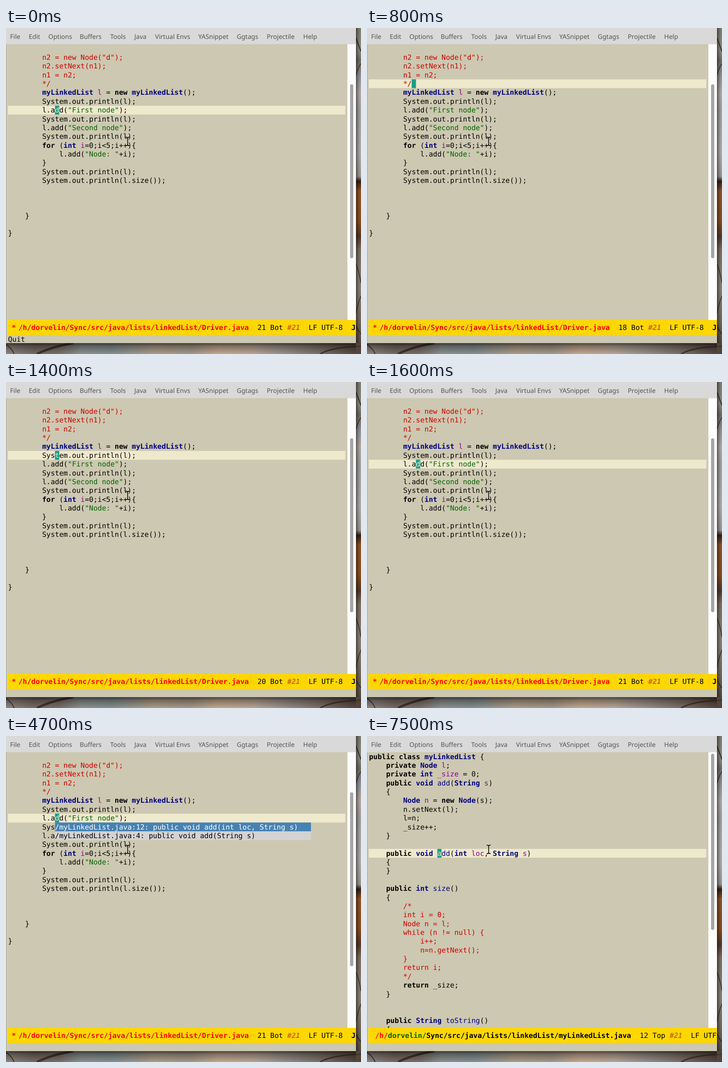
Recreate the animation shown at these times as an HTML page with a canvas. Size 780 by 718 pixels, loop 8 s.

```html
<!DOCTYPE html>
<html lang="en">
<head>
<meta charset="utf-8">
<title>Editor: jump to definition</title>
<style>
  html, body { margin: 0; width: 100%; height: 100%; overflow: hidden; background: #8a8378; }
  canvas { display: block; }
</style>
</head>
<body>
<canvas id="stage" width="780" height="718"></canvas>
<script>
const ctx = document.getElementById('stage').getContext('2d');
const LOOP = 8000;
const W = 780, H = 718;
const WIN_R = 769, WIN_B = 694;
const X0 = 4.5, COL = 9.374, TOP = 35.6, ROW = 19.37, BASE = 15;
const SIZE = 15.57;
const MONO = `${SIZE}px "DejaVu Sans Mono", monospace`;
const BG = '#cdc8b1', HILITE = '#eee8cd', CURSOR = '#1a9e86';

// Markup: @k keyword, @t type, @v variable, @f function; a leading # marks a comment line.
const STYLE = {
  k: ['bold', '#000'],
  t: ['bold', '#00007f'],
  v: ['', '#8b008b'],
  f: ['', '#00007f'],
  s: ['', '#006400'],
  c: ['', '#cd0000'],
  p: ['', '#000']
};

const DRIVER = `
#        n2 = new Node("d");
#        n2.setNext(n1);
#        n1 = n2;
#        */
        @tmyLinkedList @vl = @knew @tmyLinkedList();
        System.out.println(l);
        l.add("First node");
        System.out.println(l);
        l.add("Second node");
        System.out.println(l);
        @kfor (@tint @vi=0;i<5;i++){
            l.add("Node: "+i);
        }
        System.out.println(l);
        System.out.println(l.size());



    }

}`.split('\n');

const LIST = `@kpublic @kclass @tmyLinkedList {
    @kprivate @tNode @vl;
    @kprivate @tint @v_size = 0;
    @kpublic @tvoid @fadd(@tString @vs)
    {
        @tNode @vn = @knew @tNode(s);
        n.setNext(l);
        l=n;
        _size++;
    }

    @kpublic @tvoid @fadd(@tint @vloc, @tString @vs)
    {
    }

    @kpublic @tint @fsize()
    {
#        /*
#        int i = 0;
#        Node n = l;
#        while (n != null) {
#            i++;
#            n=n.getNext();
#        }
#        return i;
#        */
        @kreturn _size;
    }


    @kpublic @tString @ftoString()
    {`.split('\n');

const MENU = [
  ['File', 9], ['Edit', 50], ['Options', 93], ['Buffers', 162], ['Tools', 229], ['Java', 282],
  ['Virtual Envs', 327.5], ['YASnippet', 422.5], ['Ggtags', 507], ['Projectile', 573], ['Help', 653]
];

// Cursor stops in the first buffer: [start ms, row, column]
const STOPS = [
  [0, 7, 11], [400, 6, 11], [600, 5, 11], [800, 4, 10],
  [1300, 5, 11], [1400, 6, 11], [1600, 7, 11]
];

const colX = col => X0 + col * COL;
const rowY = row => TOP + row * ROW;

function rect(color, x, y, w, h) {
  ctx.fillStyle = color;
  ctx.fillRect(x, y, w, h);
}

function clipped(x, y, w, h, draw) {
  ctx.save();
  ctx.beginPath();
  ctx.rect(x, y, w, h);
  ctx.clip();
  draw();
  ctx.restore();
}

function text(str, x, y, color, style = '') {
  ctx.font = `${style} ${MONO}`;
  ctx.fillStyle = color;
  ctx.fillText(str, x, y);
  return x + str.length * COL;
}

function parse(line) {
  if (line[0] === '#') return [['c', line.slice(1)]];
  return line.split(/(@[ktvf]\w+|"[^"]*")/).filter(Boolean).map(part =>
    part[0] === '@' ? [part[1], part.slice(2)] : [part[0] === '"' ? 's' : 'p', part]);
}

function codeLine(line, y, override) {
  let x = X0;
  for (const [kind, str] of parse(line)) {
    const [style, color] = STYLE[kind];
    x = text(str, x, y, override || color, style);
  }
}

function gradient(x0, y0, x1, y1, stops) {
  const g = ctx.createLinearGradient(x0, y0, x1, y1);
  for (const [at, color] of stops) g.addColorStop(at, color);
  return g;
}

function twig(x0, y0, cx, cy, x1, y1, width) {
  ctx.lineWidth = width;
  ctx.strokeStyle = '#43342c';
  ctx.beginPath();
  ctx.moveTo(x0, y0);
  ctx.quadraticCurveTo(cx, cy, x1, y1);
  ctx.stroke();
}

function wallpaper() {
  rect(gradient(0, 0, 0, H, [
    [0, '#9c9689'], [.07, '#a8a49d'], [.1, '#877f78'], [.15, '#adb0b5'], [.2, '#d5c9c3'],
    [.25, '#c0bebf'], [.38, '#d0cdca'], [.455, '#b9b3ac'], [.47, '#37261d'], [.5, '#ad642e'],
    [.59, '#a55d25'], [.64, '#65442e'], [.68, '#968574'], [.8, '#a49a8c'],
    [.9, '#8a7b6b'], [1, '#514238']
  ]), WIN_R, 0, W - WIN_R, H);
  rect(gradient(0, 0, W, 0, [
    [0, '#8e8680'], [.08, '#766962'], [.15, '#786e68'], [.21, '#8c918f'], [.3, '#849092'],
    [.42, '#ae9d89'], [.52, '#a49889'], [.6, '#c4a98f'], [.7, '#b8a596'],
    [.8, '#928b85'], [.88, '#7d7067'], [1, '#514238']
  ]), 0, WIN_B, W, H - WIN_B);
  twig(68, 718, 100, 702, 148, 694, 5);
  twig(0, 697, 12, 704, 18, 718, 2);
  twig(690, 718, 715, 703, 780, 701, 3);
  twig(769, 22, 775, 38, 780, 52, 2);
  twig(780, 78, 773, 88, 769, 104, 1.5);
  twig(769, 520, 776, 536, 780, 562, 1.5);
  twig(780, 590, 773, 606, 769, 630, 1.5);
  twig(769, 655, 774, 668, 780, 674, 2);

  const fade = [[0, 'rgba(0,0,0,.6)'], [.3, 'rgba(0,0,0,.32)'], [1, 'rgba(0,0,0,0)']];
  rect(gradient(0, WIN_B, 0, H, fade), 0, WIN_B, WIN_R, H - WIN_B);
  rect(gradient(WIN_R, 0, W + 4, 0, fade), WIN_R, 0, W - WIN_R, WIN_B);
}

function frame(thumbY, thumbH) {
  rect(BG, 0, 0, WIN_R, WIN_B);
  rect('#aaa692', 0, 36, 1, WIN_B - 36);
  rect('#d9d9d9', 0, 0, WIN_R, 35.6);
  ctx.font = '14.05px "Noto Sans", sans-serif';
  ctx.fillStyle = '#57534f';
  for (const [label, x] of MENU) ctx.fillText(label, x, 23.7);
  rect('#fcfcfc', 750, 35.6, WIN_R - 750, 607.4);
  ctx.fillStyle = '#a5a5a5';
  ctx.beginPath();
  ctx.roundRect(756, thumbY, 7, thumbH, 3.5);
  ctx.fill();
}

function buffer(lines, row, col, flash) {
  clipped(0, TOP, 750, 643 - TOP, () => {
    const y = rowY(row), x = colX(col);
    rect(HILITE, 4, y, 741.5, ROW);
    if (flash) beacon(x, y);
    lines.forEach((line, i) => codeLine(line, rowY(i) + BASE));
    rect(CURSOR, x, y, COL, ROW);
    clipped(x, y, COL, ROW, () => codeLine(lines[row], y + BASE, flash ? '#6f8a83' : HILITE));
  });
}

// Grey flash after the jump, fading to the page colour one column at a time
function beacon(x, y) {
  const steps = 39, from = [128, 128, 128], to = [205, 200, 177];
  for (let i = 0; i < steps; i++) {
    const rgb = from.map((v, c) => Math.round(v + (to[c] - v) * i / steps));
    const left = Math.round(x + i * COL), right = Math.round(x + (i + 1) * COL);
    rect(`rgb(${rgb})`, left, y, right - left, ROW);
  }
}

function modeline(x, path, line, place) {
  clipped(3, 643, WIN_R - 3, 33, () => {
    rect('#ffd700', 3, 643, WIN_R - 3, 33);
    const y = 664.8;
    for (const [str, color] of path) x = text(str, x, y, color, 'bold');
    x += 2 * COL;
    text(`${line} ${place}`, x, y, '#000');
    text('#21', x + 7 * COL, y, '#cd6600', 'italic bold');
    text('LF UTF-8', x + 12 * COL, y, '#000');
    text('Java', x + 22 * COL, y, '#000', 'bold');
  });
}

function popup() {
  const x = colX(11), w = 60 * COL;
  const items = [
    ['/myLinkedList.java:12: public void add(int loc, String s)', '#4682b4', '#fff'],
    ['/myLinkedList.java:4: public void add(String s)', '#d3d3d3', '#000']
  ];
  items.forEach(([str, back, fore], i) => {
    const y = rowY(8 + i);
    rect(back, x, y, w, ROW);
    text(str, x, y + BASE, fore);
  });
}

function pointer() {
  const path = new Path2D('M263 240.5H265.5L267.3 242L269 240.5H271.5M267.3 242V257.5M263 259H265.5L267.3 257.5L269 259H271.5');
  ctx.lineWidth = 3.4;
  ctx.strokeStyle = 'rgba(255,255,255,.7)';
  ctx.stroke(path);
  ctx.lineWidth = 1.8;
  ctx.strokeStyle = '#000';
  ctx.stroke(path);
}

function drawDriver(t) {
  const [, row, col] = STOPS.filter(s => s[0] <= t).pop();
  frame(124, 383);
  buffer(DRIVER, row, col);
  text('*', 12.4, 664.8, '#f00', 'bold');
  modeline(27.5, [['/h/dorvelin/Sync/src/java/lists/linkedList/Driver.java', '#f00']], row + 14, 'Bot');
  text('*', 12.4, 664.8, '#f00', 'bold');
  if (t < 400) codeLine('Quit', 690.6);
  else if (t >= 2100 && t < 4700) codeLine('    @kpublic @tvoid @fadd(@tString @vs)  [guess]', 690.6);
  if (t >= 4700) popup();
}

function drawList(t) {
  frame(39, 388);
  buffer(LIST, 11, 16, t < 7500);
  modeline(18, [
    ['/h/', '#f00'], ['dorvelin/', '#006400'],
    ['Sync/src/java/lists/linkedList/myLinkedList.java', '#000']
  ], 12, 'Top');
}

function draw(t) {
  wallpaper();
  if (t < 7200) drawDriver(t);
  else drawList(t);
  pointer();
}

ctx.textRendering = 'geometricPrecision';
const start = performance.now();
function tick() {
  draw((performance.now() - start) % LOOP);
  requestAnimationFrame(tick);
}
tick();
</script>
</body>
</html>
```
